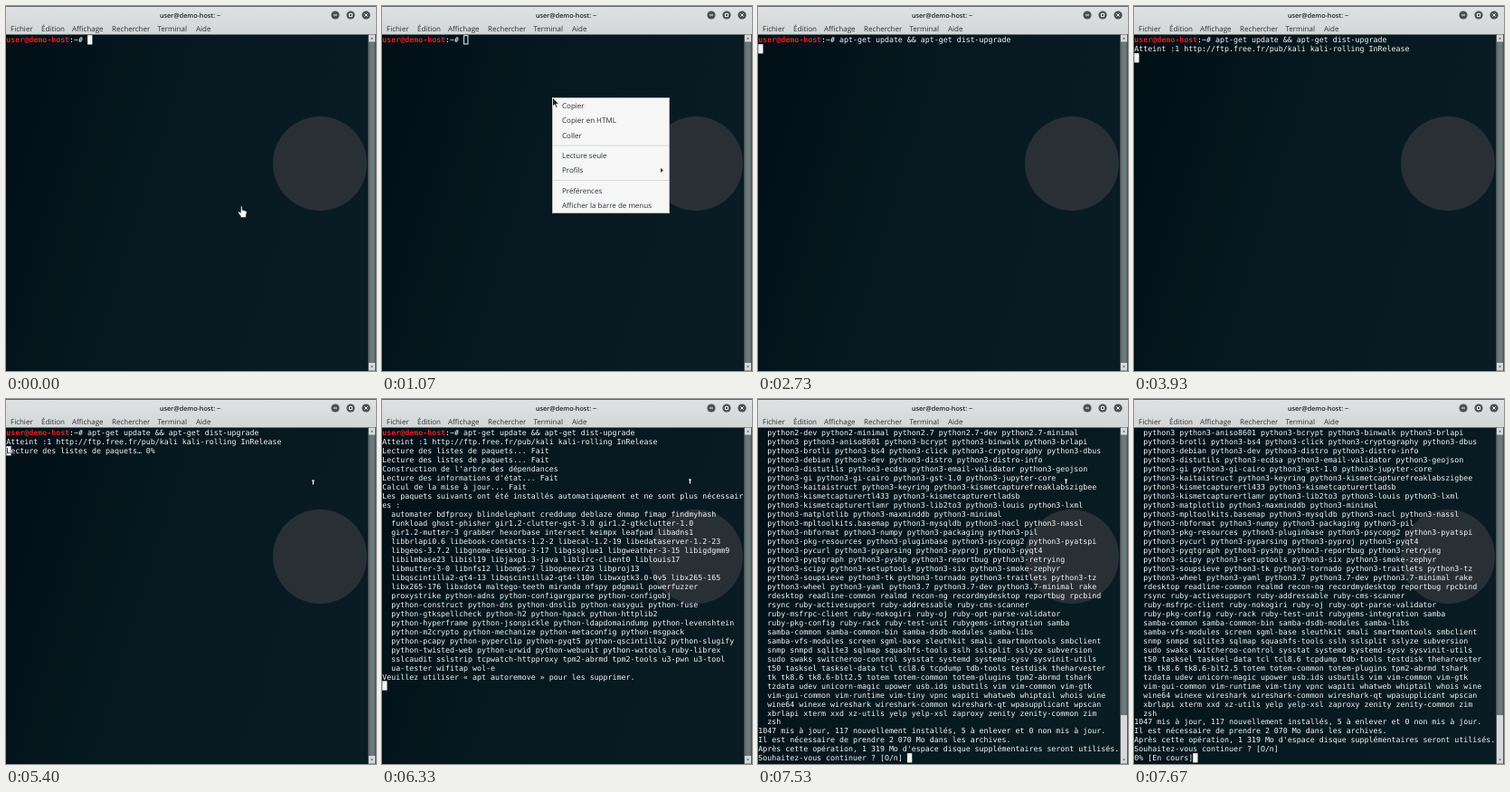
Animation, 409 px wide and 403 px high, one loop 8 s. Source, as an HTML page:

```html
<!DOCTYPE html>
<html lang="fr">
<head>
<meta charset="utf-8">
<title>Terminal</title>
<style>
  html, body { margin: 0; width: 100%; height: 100%; overflow: hidden; background: #04141b; }
  svg { display: block; width: 100%; height: 100%; }
  text { white-space: pre; text-rendering: geometricPrecision; }
  .ui { font: 8px "Open Sans", "Noto Sans", sans-serif; fill: #2a3033; }
  .title { font-weight: 600; font-size: 7.2px; text-anchor: middle; fill: #1d2225; }
  .term { font: 8.29px "DejaVu Sans Mono", monospace; fill: #f2f5f5; }
  .host { font-weight: bold; fill: #e8201c; }
</style>
</head>
<body>
<svg id="stage" viewBox="0 0 409 403" preserveAspectRatio="none">
  <defs>
    <linearGradient id="wall" x1="0" y1="0.1" x2="1" y2="0.4">
      <stop offset="0" stop-color="#010f17"/>
      <stop offset="0.2" stop-color="#03131b"/>
      <stop offset="0.45" stop-color="#06181f"/>
      <stop offset="1" stop-color="#091c23"/>
    </linearGradient>
    <linearGradient id="bar" x1="0" y1="0" x2="0" y2="1">
      <stop offset="0" stop-color="#dfe1e2"/>
      <stop offset="1" stop-color="#d3d6d7"/>
    </linearGradient>
  </defs>
  <rect width="409" height="403" fill="url(#wall)"/>
  <circle cx="347" cy="174" r="52" fill="#293035"/>
  <g id="chrome">
    <rect width="409" height="31.5" fill="url(#bar)"/>
    <rect width="409" height="1" fill="#5d6a70"/>
  </g>
  <g id="scroll">
    <rect x="400" y="31" width="9" height="372" fill="#4b5659"/>
    <rect x="401.5" y="39" width="6" height="355" fill="#6c777a"/>
    <rect id="thumb" x="401" y="349" width="7" height="45" fill="#d6d9da"/>
    <rect x="401" y="31.5" width="7" height="8" fill="#d6d9da"/>
    <rect x="401" y="394" width="7" height="8.5" fill="#d6d9da"/>
    <path d="M403 36.5l1.5-2 1.5 2zM403 397.5l1.5 2 1.5-2z" fill="#5b6468"/>
  </g>
  <rect id="cursor"/>
  <g id="rows"></g>
  <text id="under" class="term" style="fill:#04141b"></text>
  <g id="menu">
    <rect x="188.5" y="101.5" width="129" height="127" fill="#f6f6f6" stroke="#b4b9bb"/>
    <rect id="hover" x="189" width="128" height="16.3" fill="#4a90d9"/>
  </g>
  <g id="pointer">
    <path id="hand" d="M-1.5-6q1.3-.6 1.6.8v3.4l4 1q1.2.4 1 1.8l-.8 3.6v2H-1.6v-1.6L-4.2 1.6q-.8-1.6.8-1.5l1.7 1.2z"
      fill="#fff" stroke="#20282c" stroke-width=".7"/>
    <path id="arrow" d="M0 0v10l2.4-2.2 1.6 3.6 1.6-.7-1.6-3.5h3.2z" fill="#222" stroke="#fff" stroke-width=".7"/>
    <g id="beam" fill="none">
      <path d="M-1.5-2h3M0-2v5" stroke="#10191d" stroke-width="2"/>
      <path d="M-1.5-2h3M0-2v4.5" stroke="#fff" stroke-width="1.2"/>
    </g>
  </g>
</svg>
<script>
const LOOP = 8000, STEP = 1000 / 15;
const LEFT = 0.3, COL = 4.99, TOP = 32.2, PITCH = 9.97, BASE = 8.25, ROWS = 37;
const HOST = 'user@demo-host';
const $ = id => document.getElementById(id);

function add(parent, tag, attrs, text) {
  const el = document.createElementNS('http://www.w3.org/2000/svg', tag);
  for (const key in attrs) el.setAttribute(key, attrs[key]);
  if (text) el.textContent = text;
  parent.append(el);
  return el;
}
const set = (el, attrs) => { for (const key in attrs) el.setAttribute(key, attrs[key]); };
const show = (el, on) => { el.style.display = on ? '' : 'none'; };
const indent = block => block.trim().split('\n').map(line => '  ' + line);

// Window chrome
const chrome = $('chrome');
add(chrome, 'text', { class: 'ui title', x: 203.5, y: 12.8 }, HOST + ': ~');
[['Fichier', 5], ['Édition', 39], ['Affichage', 73], ['Rechercher', 117], ['Terminal', 167.5], ['Aide', 210]]
  .forEach(([label, x]) => add(chrome, 'text', { class: 'ui', x, y: 28.3 }, label));
['M-2 0h4', 'M-1.6-1.6h3.2v3.2h-3.2z', 'M-1.6-1.6l3.2 3.2M1.6-1.6l-3.2 3.2'].forEach((d, i) => {
  const button = add(chrome, 'g', { transform: `translate(${364 + 17 * i} 10)` });
  add(button, 'circle', { r: 4.6, fill: '#4b5256' });
  add(button, 'path', { d, fill: 'none', stroke: '#f4f5f5' });
});

// Context menu
const menu = $('menu'), items = [];
[['Copier', 102], ['Copier en HTML', 118.3], ['Coller', 134.6], ['Lecture seule', 157],
 ['Profils', 173.3], ['Préférences', 195.5], ['Afficher la barre de menus', 211.8]]
  .forEach(([label, y]) => items.push(add(menu, 'text', { class: 'ui', x: 199, y: y + 11 }, label)));
[154, 192.5].forEach(y => add(menu, 'path', { d: `M189 ${y}h128`, stroke: '#d5d8d9' }));
add(menu, 'path', { d: 'M308 179l3 2.5-3 2.5z', fill: '#30363a' });

// Terminal contents
const prompt = HOST + ':~# ';
const typed = prompt + 'apt-get update && apt-get dist-upgrade';
const hit = [typed, 'Atteint :1 http://ftp.free.fr/pub/kali kali-rolling InRelease'];
const lists = 'Lecture des listes de paquets', tree = 'Construction de l\'arbre des dépendances';
const done = lists + '... Fait';
const ready = [...hit, done, done, tree, 'Lecture des informations d\'état... Fait',
  'Calcul de la mise à jour... Fait'];

const unused = [...ready,
  'Les paquets suivants ont été installés automatiquement et ne sont plus nécessair', 'es :',
  ...indent(`
automater bdfproxy blindelephant creddump deblaze dnmap fimap findmyhash
funkload ghost-phisher gir1.2-clutter-gst-3.0 gir1.2-gtkclutter-1.0
gir1.2-mutter-3 grabber hexorbase intersect keimpx leafpad libadns1
libbrlapi0.6 libebook-contacts-1.2-2 libecal-1.2-19 libedataserver-1.2-23
libgeos-3.7.2 libgnome-desktop-3-17 libgssglue1 libgweather-3-15 libigdgmm9
libilmbase23 libisl19 libjaxp1.3-java liblirc-client0 liblouis17
libmutter-3-0 libnfs12 libomp5-7 libopenexr23 libproj13
libqscintilla2-qt4-13 libqscintilla2-qt4-l10n libwxgtk3.0-0v5 libx265-165
libx265-176 libxdot4 maltego-teeth miranda nfspy pdgmail powerfuzzer
proxystrike python-adns python-configargparse python-configobj
python-construct python-dns python-dnslib python-easygui python-fuse
python-gtkspellcheck python-h2 python-hpack python-httplib2
python-hyperframe python-jsonpickle python-ldapdomaindump python-levenshtein
python-m2crypto python-mechanize python-metaconfig python-msgpack
python-pcapy python-pyperclip python-pyqt5 python-qscintilla2 python-slugify
python-twisted-web python-urwid python-webunit python-wxtools ruby-librex
sslcaudit sslstrip tcpwatch-httpproxy tpm2-abrmd tpm2-tools u3-pwn u3-tool
ua-tester wifitap wol-e`),
  'Veuillez utiliser « apt autoremove » pour les supprimer.', ''];

const upgrade = [...indent(`
python2-dev python2-minimal python2.7 python2.7-dev python2.7-minimal
python3 python3-aniso8601 python3-bcrypt python3-binwalk python3-brlapi
python3-brotli python3-bs4 python3-click python3-cryptography python3-dbus
python3-debian python3-dev python3-distro python3-distro-info
python3-distutils python3-ecdsa python3-email-validator python3-geojson
python3-gi python3-gi-cairo python3-gst-1.0 python3-jupyter-core
python3-kaitaistruct python3-keyring python3-kismetcapturefreaklabszigbee
python3-kismetcapturertl433 python3-kismetcapturertladsb
python3-kismetcapturertlamr python3-lib2to3 python3-louis python3-lxml
python3-matplotlib python3-maxminddb python3-minimal
python3-mpltoolkits.basemap python3-mysqldb python3-nacl python3-nassl
python3-nbformat python3-numpy python3-packaging python3-pil
python3-pkg-resources python3-pluginbase python3-psycopg2 python3-pyatspi
python3-pycurl python3-pyparsing python3-pyproj python3-pyqt4
python3-pyqtgraph python3-pyshp python3-reportbug python3-retrying
python3-scipy python3-setuptools python3-six python3-smoke-zephyr
python3-soupsieve python3-tk python3-tornado python3-traitlets python3-tz
python3-wheel python3-yaml python3.7 python3.7-dev python3.7-minimal rake
rdesktop readline-common realmd recon-ng recordmydesktop reportbug rpcbind
rsync ruby-activesupport ruby-addressable ruby-cms-scanner
ruby-msfrpc-client ruby-nokogiri ruby-oj ruby-opt-parse-validator
ruby-pkg-config ruby-rack ruby-test-unit rubygems-integration samba
samba-common samba-common-bin samba-dsdb-modules samba-libs
samba-vfs-modules screen sgml-base sleuthkit smali smartmontools smbclient
snmp snmpd sqlite3 sqlmap squashfs-tools sslh sslsplit sslyze subversion
sudo swaks switcheroo-control sysstat systemd systemd-sysv sysvinit-utils
t50 tasksel tasksel-data tcl tcl8.6 tcpdump tdb-tools testdisk theharvester
tk tk8.6 tk8.6-blt2.5 totem totem-common totem-plugins tpm2-abrmd tshark
tzdata udev unicorn-magic upower usb.ids usbutils vim vim-common vim-gtk
vim-gui-common vim-runtime vim-tiny vpnc wapiti whatweb whiptail whois wine
wine64 winexe wireshark wireshark-common wireshark-qt wpasupplicant wpscan
xbrlapi xterm xxd xz-utils yelp yelp-xsl zaproxy zenity zenity-common zim
zsh`),
  '1047 mis à jour, 117 nouvellement installés, 5 à enlever et 0 non mis à jour.',
  'Il est nécessaire de prendre 2 070 Mo dans les archives.',
  'Après cette opération, 1 319 Mo d\'espace disque supplémentaires seront utilisés.',
  'Souhaitez-vous continuer ? [O/n] '];
const accepted = upgrade.slice(1);

// Each screen: start time, lines, cursor column (default: end of the last line)
const screens = [
  [0, [prompt]],
  [1730, [typed]],
  [2730, [typed, '']],
  [3070, [typed, '0% [En cours]']],
  [3130, [...hit, '']],
  [5400, [...hit, lists + '… 0%'], 0],
  [5470, [...hit, lists + '… 45%'], 0],
  [5530, [...hit, lists + '… 92%'], 0],
  [5600, [...hit, done, lists + '… 0%'], 0],
  [5730, [...hit, done, lists + '… 78%'], 0],
  [5800, [...ready.slice(0, 4), tree + '… 50%'], 0],
  [5930, [...ready.slice(0, 6), '']],
  [6000, [...ready, '']],
  [6130, unused],
  [6470, upgrade],
  [7600, [...accepted, '']],
  [7670, [...accepted, '0% [En cours]']]
];

const slots = Array.from({ length: ROWS }, (_, r) =>
  add($('rows'), 'text', { class: 'term', x: LEFT, y: TOP + r * PITCH + BASE }));
let drawn = null;

function drawLines(lines) {
  if (lines === drawn) return;
  drawn = lines;
  slots.forEach((slot, r) => {
    const line = lines[r] || '';
    slot.textContent = '';
    if (line.startsWith(HOST)) {
      add(slot, 'tspan', { class: 'host' }, HOST);
      add(slot, 'tspan', {}, line.slice(HOST.length));
    } else slot.textContent = line;
  });
}

function cursorOn(t) {
  if (t < 2730) return t < 2330 || t >= 2670;
  return Math.floor((t - 2730) / 600) % 2 === 0;
}

function drawCursor(t, lines, column) {
  const row = lines.length - 1, col = column ?? lines[row].length;
  const hollow = t >= 1000 && t < 1730, on = cursorOn(t);
  const x = LEFT + col * COL, y = TOP + row * PITCH, inset = hollow ? 0.5 : 0;
  set($('cursor'), {
    x: x + inset, y: y + inset, width: 5.3 - 2 * inset, height: 10.3 - 2 * inset,
    fill: hollow ? 'none' : '#f2f5f5', stroke: hollow ? '#f2f5f5' : 'none'
  });
  show($('cursor'), on);
  set($('under'), { x, y: y + BASE });
  $('under').textContent = on ? lines[row][col] || '' : '';
}

// Pointer stops: time, x, y
const path = [
  [0, 261, 227], [400, 173.5, 90], [600, 173.5, 90], [733, 188.5, 101],
  [1200, 188.5, 101], [1467, 220.5, 137], [1867, 220.5, 137], [2067, 285, 154],
  [4733, 285, 153], [5133, 298.5, 140], [5200, 298.5, 140], [5400, 339.5, 92], [5533, 340.5, 91]
];

function pointerAt(t) {
  const tick = Math.floor((t + 4) / STEP) * STEP;
  const next = path.findIndex(p => p[0] > tick);
  if (next < 0) return path[path.length - 1].slice(1);
  const a = path[next - 1], b = path[next];
  const u = (tick - a[0]) / (b[0] - a[0]), k = u * u * (3 - 2 * u);
  return [a[1] + (b[1] - a[1]) * k, a[2] + (b[2] - a[2]) * k];
}

function drawPointer(t) {
  const [x, y] = pointerAt(t), inMenu = t >= 1000 && t < 1730;
  set($('pointer'), { transform: `translate(${x} ${y})` });
  show($('pointer'), !(t >= 2670 && t < 4800) && t < 7600);
  show($('hand'), t < 70);
  show($('arrow'), inMenu);
  show($('beam'), t >= 70 && !inMenu);

  show(menu, inMenu);
  menu.style.opacity = t < 1070 || t >= 1670 ? 0.6 : 1;
  const active = t < 1270 ? -1 : Math.min(2, Math.floor((y - 102) / 16.3));
  show($('hover'), active >= 0);
  set($('hover'), { y: 102 + 16.3 * Math.max(0, active) });
  items.forEach((item, i) => { item.style.fill = i === active ? '#fff' : ''; });
}

function render(t) {
  const [, lines, column] = screens.filter(s => s[0] <= t).pop();
  drawLines(lines);
  drawCursor(t, lines, column);
  drawPointer(t);
  show($('thumb'), t >= 6470);
}

const start = performance.now();
function frame() {
  render((performance.now() - start) % LOOP);
  requestAnimationFrame(frame);
}
frame();
</script>
</body>
</html>
```
